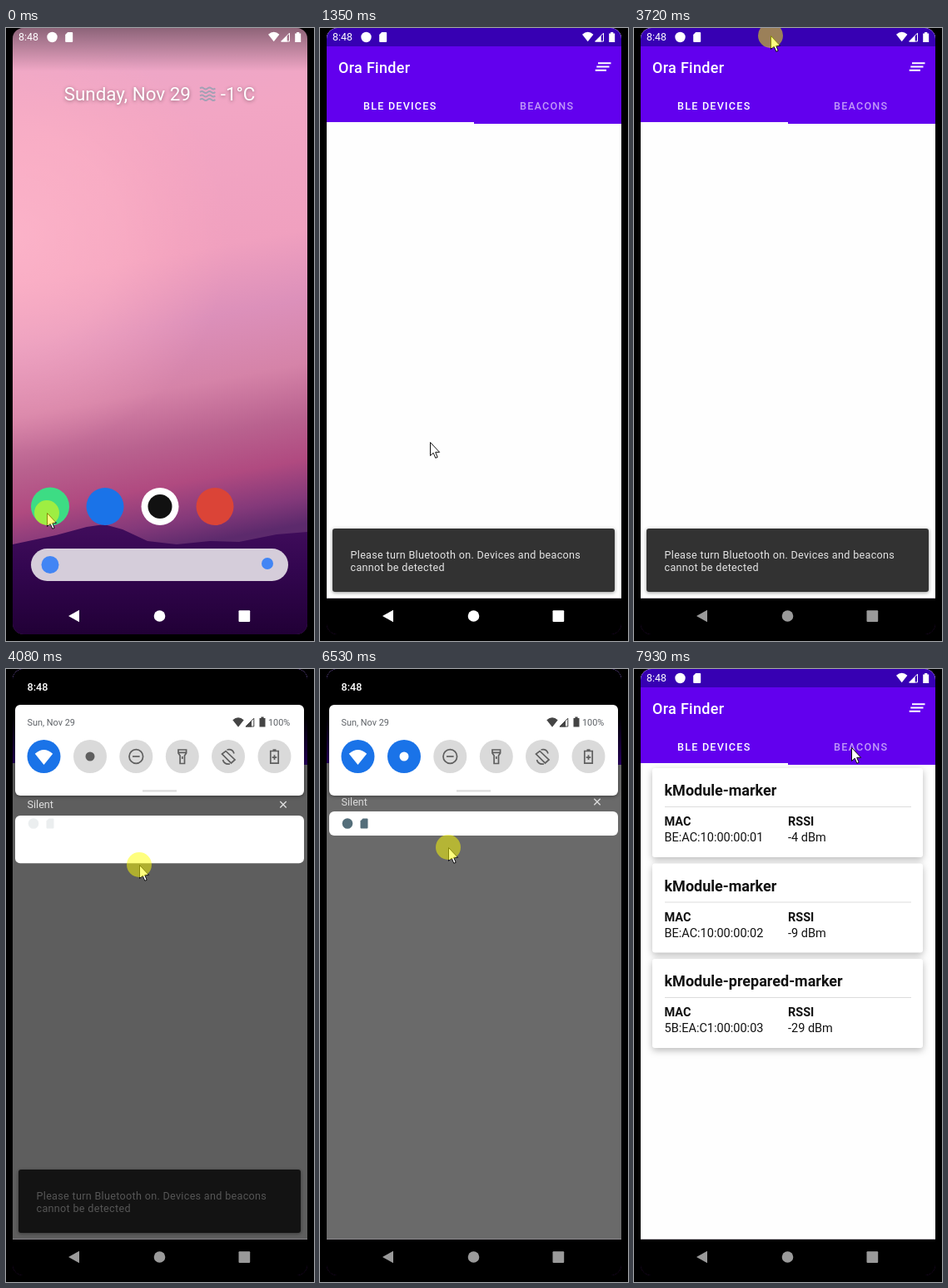
An HTML page for the animation above (8 s loop, 370 by 736 pixels).

```html
<!DOCTYPE html>
<html lang="en">
<head>
<meta charset="utf-8">
<title>Phone demo</title>
<style>
  html, body { margin: 0; width: 100%; height: 100%; overflow: hidden; background: #000; }
  svg { display: block; width: 100vw; height: 100vh; }
  text { font: 12.65px Roboto, sans-serif; white-space: pre; }
  .small { font-size: 10.9px; fill: #5f6368; }
  .med { font-weight: 500; }
  .title { font-size: 18px; font-weight: 500; }
  .row { font-size: 14.5px; }
  .bold { font-weight: 700; }
  .tab { font-size: 12.6px; font-weight: 500; letter-spacing: 1.22px; fill: #fff; }
  .snack { font-size: 12.6px; letter-spacing: .31px; fill: #fff; fill-opacity: .87; }
  .date { font-size: 22.4px; fill: #fff; }
  .shadow { filter: drop-shadow(0 1px 2px #0006); }
  .raised { filter: drop-shadow(0 3px 4px #0004); }
  .line { fill: none; stroke-width: 2; }
</style>
</head>
<body>
<svg viewBox="0 0 370 736">
  <defs>
    <linearGradient id="sky" gradientUnits="userSpaceOnUse" x1="110" y1="0" x2="225" y2="620">
      <stop offset="0" stop-color="#eaa6c9"/>
      <stop offset=".2" stop-color="#f2a6c4"/>
      <stop offset=".45" stop-color="#f0a0bf"/>
      <stop offset=".58" stop-color="#dc90ba"/>
      <stop offset=".7" stop-color="#d583a8"/>
      <stop offset=".8" stop-color="#b9628f"/>
      <stop offset=".88" stop-color="#b04a80"/>
      <stop offset=".95" stop-color="#84397a"/>
      <stop offset="1" stop-color="#5c2a6c"/>
    </linearGradient>
    <radialGradient id="glow" gradientUnits="userSpaceOnUse" cx="8" cy="250" r="260">
      <stop offset="0" stop-color="#ffb8cb" stop-opacity=".75"/>
      <stop offset=".5" stop-color="#ffb4c6" stop-opacity=".5"/>
      <stop offset="1" stop-color="#ffaabc" stop-opacity="0"/>
    </radialGradient>
    <linearGradient id="hill" x2="0" y2="1">
      <stop offset="0" stop-color="#410d5c"/>
      <stop offset=".4" stop-color="#330650"/>
      <stop offset="1" stop-color="#210036"/>
    </linearGradient>
    <linearGradient id="dusk" x2="0" y2="1">
      <stop offset="0" stop-color="#000" stop-opacity=".4"/>
      <stop offset="1" stop-color="#000" stop-opacity="0"/>
    </linearGradient>
    <linearGradient id="cover" x2="0" y2="1">
      <stop offset=".5" stop-color="#000"/>
      <stop offset="1" stop-color="#000" stop-opacity="0"/>
    </linearGradient>
    <clipPath id="screen"><rect x="8" width="354" height="728" rx="13"/></clipPath>
    <clipPath id="noteClip"><rect id="noteClipBox" x="11" width="347" rx="6"/></clipPath>
    <path id="wifi" d="M-6.7-2.7Q0-8.6 6.7-2.7L0 5.7Z"/>
    <g id="signal">
      <path d="M-5 5H4.8V-4.8Z" fill="none" stroke="currentColor"/>
      <path d="M-5.5 5.5H2V-2Z"/>
    </g>
    <path id="battery" d="M-3.5-4.5H-1.6V-6H1.6V-4.5H3.5V6H-3.5Z"/>
    <path id="card" d="M-1.5-6H3.5Q4.5-6 4.5-5V5Q4.5 6 3.5 6H-3.5Q-4.5 6-4.5 5V-3Z"/>
  </defs>

  <g clip-path="url(#screen)">
    <g id="home">
      <path d="M8 0H362V728H8Z" fill="url(#sky)"/>
      <path d="M8 0H362V520H8Z" fill="url(#glow)"/>
      <path d="M8 620L60 609 97 599 118 596 140 602 170 616 205 620 245 616 280 617 325 608 362 605V728H8Z" fill="url(#hill)"/>
      <path d="M8 0H362V52H8Z" fill="url(#dusk)"/>
      <g class="shadow">
        <text class="date" x="69.7" y="87">Sunday, Nov 29</text>
        <text class="date" x="257.7" y="87">-1°C</text>
      </g>
      <path id="fog" fill="none" stroke="#a3a0b4" stroke-width="1.7"/>
      <g id="icons">
        <circle cx="53" cy="574.5" r="23" fill="#3ddc84"/>
        <circle cx="119" cy="574.5" r="22.5" fill="#1a73e8"/>
        <circle cx="185" cy="574.5" r="22.5" fill="#fff"/>
        <circle cx="185" cy="574.5" r="14.5" fill="#111"/>
        <circle cx="251" cy="574.5" r="22.5" fill="#db4437"/>
        <rect x="30" y="625" width="309" height="39" rx="19.5" fill="#d5cdda"/>
        <circle cx="53" cy="644.5" r="10.5" fill="#4285f4"/>
        <circle cx="314" cy="643" r="7" fill="#4285f4"/>
      </g>
    </g>
    <rect id="navBack" x="8" y="684.5" width="354" height="44"/>

    <rect id="win" fill="#fefefe"/>
    <rect id="winBar" fill="#3700b3"/>

    <g id="app">
      <path d="M8 0H362V684.5H8Z" fill="#fefefe"/>
      <g id="cards"></g>
      <path d="M8 22H362V115H8Z" fill="#6200ee"/>
      <path d="M8 0H362V22H8Z" fill="#3700b3"/>
      <path d="M8 113H185V115H8Z" fill="#fff"/>
      <text class="title" x="22" y="54" fill="#fff" letter-spacing=".3">Ora Finder</text>
      <path class="line" d="M334 42.3H349.5M332.3 46.5H347.5M330.7 50.7H344" stroke="#fff"/>
      <text class="tab" x="52" y="98">BLE DEVICES</text>
      <text class="tab" x="240" y="98" opacity=".6">BEACONS</text>
      <g id="snack" class="shadow">
        <rect x="15" y="601" width="339" height="76" rx="3" fill="#323232"/>
        <text class="snack" x="36.5" y="637">Please turn Bluetooth on. Devices and beacons</text>
        <text class="snack" x="36.5" y="652">cannot be detected</text>
      </g>
    </g>

    <g fill="#fff" color="#fff">
      <text x="15" y="15" style="font-size:12.4px">8:48</text>
      <circle cx="55.5" cy="11" r="6.2"/>
      <use href="#card" x="75.7" y="11"/>
      <use href="#wifi" x="321.7" y="10.5"/>
      <use href="#signal" x="335.7" y="11"/>
      <use href="#battery" x="350.7" y="11"/>
    </g>

    <g id="shade">
      <rect id="scrim" x="8" width="354" height="684.5"/>
      <rect id="top" x="8" width="354" height="115" fill="url(#cover)"/>
      <g id="silent" fill="#fff">
        <text x="25.5" y="182">Silent</text>
        <path class="line" d="M329.3 174.3L336.7 181.7M336.7 174.3L329.3 181.7" stroke="#fff" style="stroke-width:1.4"/>
      </g>
      <g id="notes" clip-path="url(#noteClip)">
        <path d="M11 160H358V400H11Z" fill="#fff"/>
        <g id="noteText" fill="#222">
          <path d="M11 294.5H358" stroke="#e0e0e0"/>
          <circle cx="33" cy="222.5" r="7.5" fill="#546e7a"/>
          <text class="small" x="47" y="227" style="fill:#333">Android System</text>
          <text x="25.5" y="255">Serial console enabled</text>
          <text x="25.5" y="273">Performance is impacted. To disable, check bootloader.</text>
          <use href="#card" transform="translate(33 317.5) scale(1.15)" fill="#546e7a"/>
          <text class="small" x="47" y="322" style="fill:#333">Settings</text>
          <path class="line" d="M327.5 315.5L333.5 321.5 339.5 315.5" stroke="#222" style="stroke-width:1.7"/>
          <text x="25.5" y="350">Virtual SD card</text>
          <text x="25.5" y="368">Tap to set up</text>
        </g>
        <g id="shelf" fill="#546e7a">
          <circle cx="33" cy="185.5" r="6.3"/>
          <use href="#card" x="53" y="185.5"/>
        </g>
      </g>
      <g id="manage" fill="#fff">
        <text x="25.5" y="420">Manage</text>
        <text x="343.5" y="420" text-anchor="end">Clear all</text>
      </g>
      <g id="quick">
        <rect class="shadow" x="11" y="43" width="347" height="109" rx="6" fill="#fff"/>
        <text class="small" x="25.5" y="68">Sun, Nov 29</text>
        <text class="small" x="315" y="68">100%</text>
        <g fill="#444" color="#444">
          <use href="#wifi" x="279" y="64"/>
          <use href="#signal" x="293" y="64"/>
          <use href="#battery" x="308" y="63.5"/>
        </g>
        <g fill="#dadada">
          <circle cx="45.5" cy="105" r="20" fill="#1a73e8"/>
          <circle id="blue" cx="101" cy="105" r="20"/>
          <circle cx="156.3" cy="105" r="20"/>
          <circle cx="211.8" cy="105" r="20"/>
          <circle cx="267" cy="105" r="20"/>
          <circle cx="322.5" cy="105" r="20"/>
        </g>
        <use href="#wifi" transform="translate(45.5 106) scale(1.6)" fill="#fff"/>
        <circle id="blueDot" cx="101" cy="105" r="5.5"/>
        <g class="line" stroke="#5f5f5f" style="stroke-width:1.7">
          <circle cx="156.3" cy="105" r="8.3"/>
          <path d="M152 105H160.6"/>
          <path d="M207 97H216.6V101L214.5 104V113.5H209.1V104L207 101ZM207 100.3H216.6M211.8 105V108"/>
          <path d="M264 98.5L275 109 270.5 113 259.5 102ZM265.5 97Q272 95.5 274 101.5M269 114Q262 115 260.5 109"/>
          <path d="M317.8 98.5H327.2V113.2H317.8ZM320.5 97H324.5M322.5 103.3V109M319.7 106.1H325.3"/>
        </g>
        <path d="M164 145.3H205V147.6H164Z" fill="#dcdcdc"/>
      </g>
      <text id="clock" class="med" x="25.5" y="26" fill="#fff">8:48</text>
    </g>

    <g id="nav" fill="#fff">
      <path d="M75 706L88 698.8V713.2Z"/>
      <circle cx="184.5" cy="706" r="6.8"/>
      <rect x="279.5" y="699.3" width="13.7" height="13.7" rx="1"/>
    </g>
  </g>

  <g id="mouse">
    <path d="M.5.5V16.5L4.2 13.2 6.8 19.3 9.2 18.3 6.7 12.3H11.6Z" fill="#fff" stroke="#111"/>
    <circle id="press" r="15" fill="#ff0" fill-opacity=".5"/>
  </g>
</svg>
<script>
const LOOP = 8000;
const $ = id => document.getElementById(id);
const set = (id, attrs) => { for (const k in attrs) $(id).setAttribute(k, attrs[k]); };
const show = (id, on) => set(id, { visibility: on ? 'visible' : 'hidden' });
const shift = (id, y, opacity = 1) => set(id, { transform: `translate(0 ${y})`, opacity });
const clamp = v => Math.min(1, Math.max(0, v));
const span = (t, a, b) => clamp((t - a) / (b - a));
const mix = (a, b, p) => a + (b - a) * p;

// Keys are [time, ...values]; every segment eases in and out.
function track(t, keys) {
  const i = keys.findIndex(k => k[0] > t);
  if (i < 0) return keys[keys.length - 1].slice(1);
  if (!i) return keys[0].slice(1);
  const a = keys[i - 1], b = keys[i];
  const u = span(t, a[0], b[0]), p = u * u * (3 - 2 * u);
  return a.slice(1).map((v, j) => mix(v, b[j + 1], p));
}

const pointer = [
  [0, 49, 582], [1130, 49, 582], [1630, 250, 377], [2000, 250, 377], [2040, 255, 377],
  [2770, 255, 377], [3540, 164, 9], [3730, 164, 9], [4050, 160, 235], [4130, 160, 235],
  [4510, 135, 109], [4570, 135, 109], [4820, 100, 107], [5280, 100, 107], [5660, 157, 420],
  [6400, 157, 420], [6530, 154, 214], [6650, 154, 214], [7110, 154, 214],
  [7420, 262, 221], [7660, 282, 150], [7930, 261, 94]
];
const presses = [[0, 170], [3720, 4130], [5020, 5160], [6400, 6680]];
const pull = [[3750, 0], [3990, .4], [4330, 1], [6420, 1], [6530, .4], [6560, .4], [6860, 0]];

const devices = [
  ['kModule-marker', 'BE:AC:10:00:00:01', -4],
  ['kModule-marker', 'BE:AC:10:00:00:02', -9],
  ['kModule-prepared-marker', '5B:EA:C1:00:00:03', -29]
];
$('cards').innerHTML = devices.map(([name, mac, rssi], i) => `
  <g transform="translate(0 ${i * 114.5})" fill="#111">
    <rect class="raised" x="22" y="119" width="325" height="107" rx="3" fill="#fff"/>
    <text class="title bold" x="36.5" y="152">${name}</text>
    <path d="M37 165.5H333" stroke="#dcdcdc"/>
    <text class="row bold" x="36.5" y="188">MAC</text>
    <text class="row bold" x="185" y="188">RSSI</text>
    <text class="row" x="36.5" y="207">${mac}</text>
    <text class="row" x="185" y="207">${rssi} dBm</text>
  </g>`).join('');
$('fog').setAttribute('d', [72.5, 77, 81.5, 86].map(y => `M233 ${y}q2.3-2 4.6 0t4.6 0 4.6 0 4.6 0`).join(''));

function drawLaunch(t) {
  const p = 1 - (1 - span(t, 180, 725)) ** 5;
  const grow = clamp(p * 1.01);
  const box = { x: mix(30, 8, grow), y: mix(552, 0, p), width: mix(46, 354, grow), rx: 20 * (1 - grow) };
  set('win', { ...box, height: mix(46, 684.5, grow), opacity: clamp(p * 4) });
  set('winBar', { ...box, height: 21.7 * p, opacity: clamp(p * 4) });
  set('navBack', { opacity: grow });
  set('icons', { opacity: 1 - clamp(p * 1.5) });
}

function drawApp(t) {
  show('app', t >= 870);
  show('cards', t >= 6620);
  const inn = span(t, 1000, 1220), out = span(t, 5840, 6250);
  shift('snack', 30 * (1 - inn) ** 2, t < 870 ? 0 : inn * (1 - out));
  const grey = Math.round(mix(255, 154, span(t, 1480, 1810)));
  set('nav', { fill: `rgb(${grey},${grey},${grey})` });
}

function drawShade(t) {
  const [d] = track(t, pull);
  const enter = clamp(d / .4), n = clamp((d - .4) / .6);
  const y = mix(171, 199, n), height = mix(29, 190, n);
  set('shade', { display: d > 0 ? 'inline' : 'none' });
  set('scrim', { opacity: .58 * enter + .27 * n });
  set('top', { opacity: enter });
  set('clock', { opacity: enter });
  shift('quick', -152 * (1 - enter), clamp(enter * 3));
  shift('silent', -18.5 * (1 - n), enter * mix(.75, 1, n));
  set('noteClipBox', { y, height });
  shift('notes', -170 * (1 - enter), enter);
  shift('noteText', y - 199, clamp(n * 4 - 1));
  set('shelf', { opacity: 1 - clamp(n * 5) });
  shift('manage', y + height - 389, clamp(n * 2 - 1));

  const on = t >= 5330, down = span(t, 5020, 5120);
  set('blue', { fill: on ? '#1a73e8' : down ? '#c4c4c4' : '#dadada', r: 20 + (on ? 1 - span(t, 5330, 5500) : down) });
  set('blueDot', { fill: on ? '#fff' : '#5f5f5f' });
}

function frame(now) {
  const t = now % LOOP;
  drawLaunch(t);
  drawApp(t);
  drawShade(t);
  set('mouse', { transform: `translate(${track(t, pointer).map(Math.round)})` });
  show('press', presses.some(([a, b]) => t >= a && t < b));
  requestAnimationFrame(frame);
}
requestAnimationFrame(frame);
</script>
</body>
</html>
```
